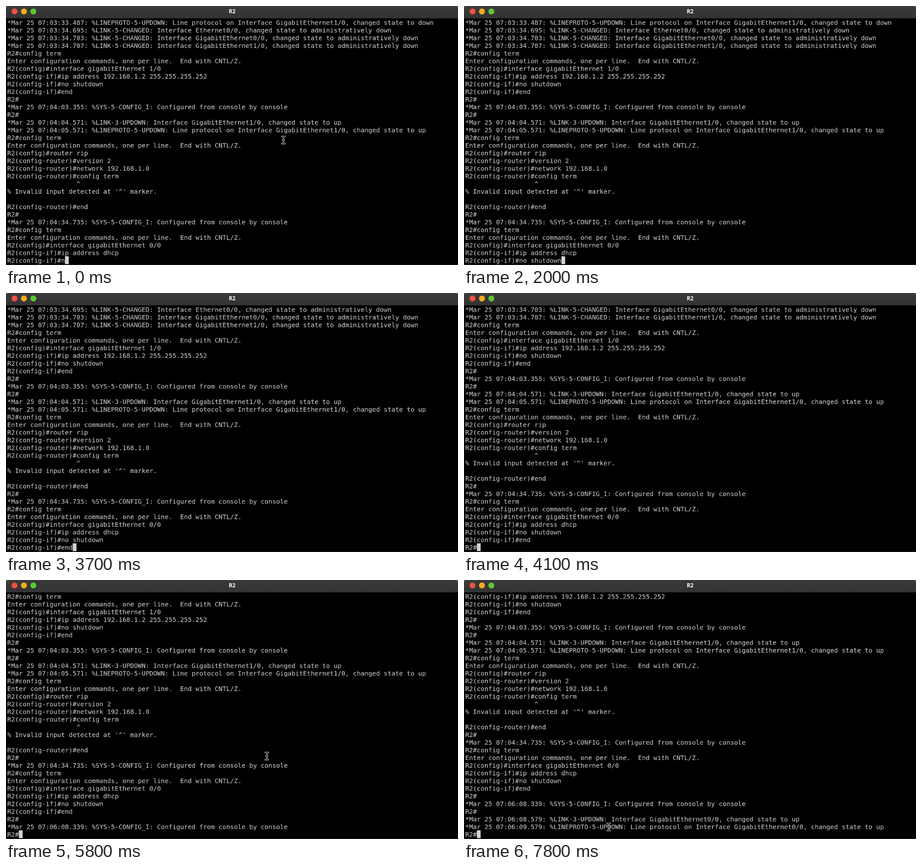
Recreate the animation shown at these times as an HTML page with a canvas. Size 988x567 px, loop 8000 ms.

```html
<!DOCTYPE html>
<html lang="en">
<head>
<meta charset="utf-8">
<title>R2</title>
<style>
  html, body { margin: 0; width: 100%; height: 100%; overflow: hidden; background: #000; }
  canvas { display: block; }
</style>
</head>
<body>
<canvas id="stage" width="988" height="567"></canvas>
<script>
const ctx = document.getElementById('stage').getContext('2d');
const LOOP = 8000, ROWS = 32;

// The terminal is set on a whole-pixel grid, then shrunk onto the stage.
const SCALE = 0.7, CELL_W = 12, CELL_H = 24, LEFT = 4, TOP = 39, BASELINE = 20;
const FOREGROUND = '#d3d2cf';
const screen = document.createElement('canvas');
screen.width = 1412;
screen.height = 810;
const term = screen.getContext('2d');

const opening = `*Mar 25 07:03:33.487: %LINEPROTO-5-UPDOWN: Line protocol on Interface GigabitEthernet1/0, changed state to down
*Mar 25 07:03:34.695: %LINK-5-CHANGED: Interface Ethernet0/0, changed state to administratively down
*Mar 25 07:03:34.703: %LINK-5-CHANGED: Interface GigabitEthernet0/0, changed state to administratively down
*Mar 25 07:03:34.707: %LINK-5-CHANGED: Interface GigabitEthernet1/0, changed state to administratively down
R2#config term
Enter configuration commands, one per line.  End with CNTL/Z.
R2(config)#interface gigabitEthernet 1/0
R2(config-if)#ip address 192.168.1.2 255.255.255.252
R2(config-if)#no shutdown
R2(config-if)#end
R2#
*Mar 25 07:04:03.355: %SYS-5-CONFIG_I: Configured from console by console
R2#
*Mar 25 07:04:04.571: %LINK-3-UPDOWN: Interface GigabitEthernet1/0, changed state to up
*Mar 25 07:04:05.571: %LINEPROTO-5-UPDOWN: Line protocol on Interface GigabitEthernet1/0, changed state to up
R2#config term
Enter configuration commands, one per line.  End with CNTL/Z.
R2(config)#router rip
R2(config-router)#version 2
R2(config-router)#network 192.168.1.0
R2(config-router)#config term
                  ^
% Invalid input detected at '^' marker.

R2(config-router)#end
R2#
*Mar 25 07:04:34.735: %SYS-5-CONFIG_I: Configured from console by console
R2#config term
Enter configuration commands, one per line.  End with CNTL/Z.
R2(config)#interface gigabitEthernet 0/0
R2(config-if)#ip address dhcp
R2(config-if)#n`;

// [time in ms, text appended to the terminal]
const output = [
  [100, 'o'], [200, ' '], [500, 's'], [600, 'h'], [1200, 'u'], [1300, 't'],
  [1600, 'd'], [1700, 'o'], [1900, 'w'], [2000, 'n'],
  [2300, '\nR2(config-if)#'], [3200, 'e'], [3700, 'nd'], [4100, '\nR2#'],
  [4900, '\n*Mar 25 07:06:08.339: %SYS-5-CONFIG_I: Configured from console by console\nR2#'],
  [6000, '\n*Mar 25 07:06:08.579: %LINK-3-UPDOWN: Interface GigabitEthernet0/0, changed state to up' +
    '\n*Mar 25 07:06:09.579: %LINEPROTO-5-UPDOWN: Line protocol on Interface GigabitEthernet0/0, changed state to up\nR2#'],
];

// [time, x, y] of the mouse pointer
const pointerPath = [
  [0, 606.5, 293.5], [5400, 606.5, 293.5], [6300, 524.5, 500.5],
  [7100, 484, 578], [7500, 355, 562], [7800, 316.5, 540.5], [LOOP, 316.5, 540.5],
];
const beam = new Path2D(
  'M-3.2 -8 Q0 -8 0 -5.5 Q0 -8 3.2 -8 M-3.2 8 Q0 8 0 5.5 Q0 8 3.2 8 M0 -6 V6 M-1.5 0 H1.5');

function drawTitleBar() {
  ctx.fillStyle = '#707070';
  ctx.fillRect(0, 0, 988, 10);
  const shade = ctx.createLinearGradient(0, 0, 0, 27);
  shade.addColorStop(0, '#3a3a3a');
  shade.addColorStop(1, '#333333');
  ctx.fillStyle = shade;
  ctx.beginPath();
  ctx.roundRect(0, 0, 988, 27, [5, 5, 0, 0]);
  ctx.fill();
  ['#ed5147', '#eeae1d', '#5ac837'].forEach((color, i) => {
    ctx.fillStyle = color;
    ctx.beginPath();
    ctx.arc(18.6 + i * 20.6, 11.9, 6.5, 0, 2 * Math.PI);
    ctx.fill();
  });
  ctx.fillStyle = '#fff';
  ctx.font = 'bold 11.8px "Open Sans", sans-serif';
  ctx.textAlign = 'center';
  ctx.fillText('R2', 494.2, 16);
}

function drawTerminal(time) {
  const text = opening + output.filter(([at]) => at <= time).map(([, added]) => added).join('');
  const lines = text.split('\n').slice(-ROWS);
  term.fillStyle = '#000';
  term.fillRect(0, 0, screen.width, screen.height);
  term.font = '19.93px "DejaVu Sans Mono", monospace';
  term.fillStyle = FOREGROUND;
  lines.forEach((line, row) => term.fillText(line, LEFT, TOP + row * CELL_H + BASELINE));
  const cursorOn = time < 4700 || time >= 5200;
  if (cursorOn) {
    const column = lines[ROWS - 1].length;
    term.fillRect(LEFT + column * CELL_W, TOP + (ROWS - 1) * CELL_H, CELL_W, CELL_H);
  }
  ctx.drawImage(screen, 0, 0, screen.width * SCALE, screen.height * SCALE);
}

function drawPointer(time) {
  const opacity = time < 5500 ? Math.max(0, Math.min(1, (1400 - time) / 400)) : 1;
  if (!opacity) return;
  const next = pointerPath.findIndex(([at]) => at > time);
  const [t0, x0, y0] = pointerPath[next - 1], [t1, x1, y1] = pointerPath[next];
  const k = (time - t0) / (t1 - t0);
  ctx.save();
  ctx.globalAlpha = opacity;
  ctx.translate(x0 + (x1 - x0) * k, y0 + (y1 - y0) * k);
  ctx.lineCap = 'round';
  for (const [color, width] of [['#e8e8e8', 3.2], ['#000', 1.3]]) {
    ctx.strokeStyle = color;
    ctx.lineWidth = width;
    ctx.stroke(beam);
  }
  ctx.restore();
}

function draw(time) {
  drawTerminal(time);
  ctx.fillStyle = '#2b1d1c';
  ctx.fillRect(0, 566, 988, 1);
  drawTitleBar();
  drawPointer(time);
}

const start = performance.now();
function frame() {
  const elapsed = (performance.now() - start) % LOOP;
  draw(Math.floor(elapsed / 100) * 100);  // ten pictures per second
  requestAnimationFrame(frame);
}
frame();
</script>
</body>
</html>
```
